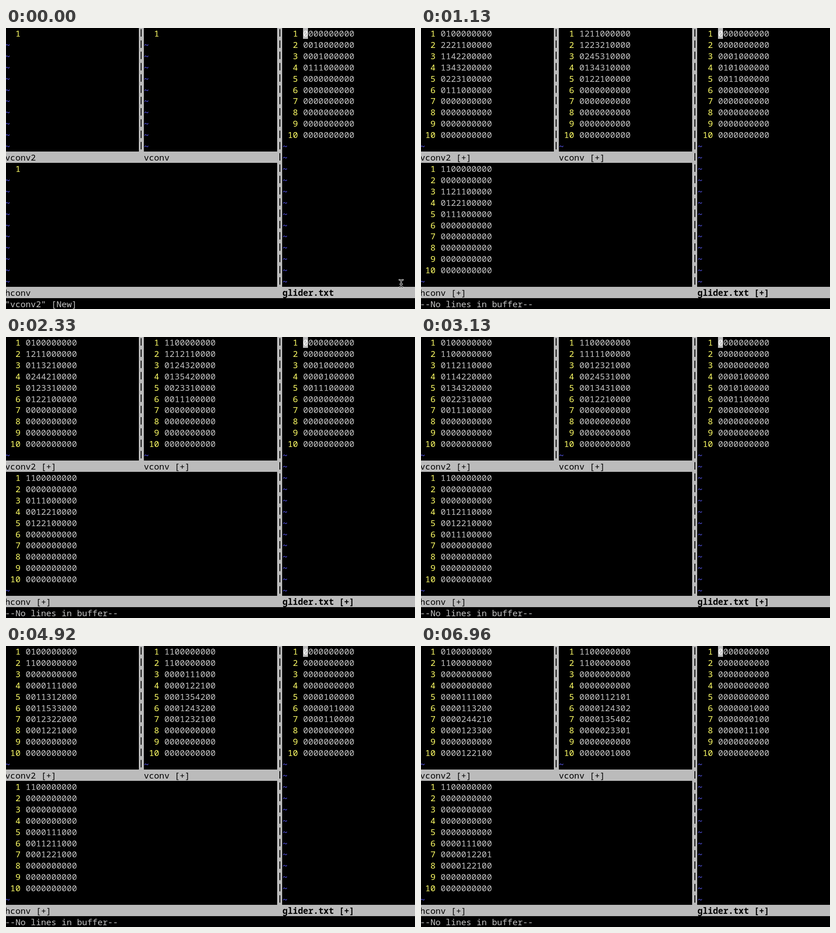
An HTML page that plays this animation: 902x621 px, repeating every 7000 ms.

```html
<!DOCTYPE html>
<html lang="en">
<head>
<meta charset="utf-8">
<title>Glider in four editor windows</title>
<style>
  html, body { margin: 0; width: 100%; height: 100%; overflow: hidden; background: #000; }
  svg { display: block; }
  text { font: 18.88px "Noto Sans Mono", "DejaVu Sans Mono", monospace; white-space: pre; fill: #c4c4c4; }
  .number { fill: #ffff66; }
  .tilde { fill: #5c5cff; }
  .status { fill: #000; }
  .active { fill: #000; font-weight: 600; }
  .under { fill: #fff; }
  .bar { fill: #bbb; }
  .split { stroke: #000; stroke-width: 2; stroke-dasharray: 16.5 8.42; }
</style>
</head>
<body>
<svg id="stage" width="902" height="621" viewBox="0 0 902 621"></svg>
<script>
const SIZE = 10, LOOP = 7000;
const FIRST = 291, STEP = 416.7;
const CELL_W = 11.33, CELL_H = 24.92;
const stage = document.getElementById('stage');

const colX = col => col * CELL_W - 2;
const rowY = row => Math.round(row * CELL_H - 1.1);
const range = n => Array.from({ length: n }, (_, i) => i);
const makeGrid = cell => range(SIZE).map(r => range(SIZE).map(c => cell(r, c)));
const at = (grid, r, c) => grid[r]?.[c] ?? 0;
const transpose = grid => makeGrid((r, c) => grid[c][r]);

function nextLife(grid) {
  return makeGrid((r, c) => {
    let sum = 0;
    for (const dr of [-1, 0, 1]) for (const dc of [-1, 0, 1]) sum += at(grid, r + dr, c + dc);
    return +(sum === 3 || (sum === 4 && grid[r][c]));
  });
}

// Sums of three along each line; the last line is skipped and column 9 spills into 10.
function convolve(grid) {
  return grid.map((line, r) => {
    if (r === SIZE - 1) return line;
    const sums = line.map((v, c) => at(grid, r, c - 1) + v + at(grid, r, c + 1));
    return [...sums.slice(0, 8), 0, sums[8]];
  });
}

function buffers(grid) {
  const marked = makeGrid((r, c) => r + c === 0 ? 1 : grid[r][c]);
  const hconv = convolve(marked);
  const vconv = convolve(transpose(hconv));
  const total = transpose(vconv);
  const vconv2 = makeGrid((r, c) => {
    const from = c < 8 ? c : 17 - c;
    return total[r][from] - marked[r][from];
  });
  return { hconv, vconv, vconv2 };
}

const start = ['0010', '0001', '0111'];
const lives = [makeGrid((r, c) => +(start[r - 1]?.[c] ?? 0))];
while (lives.length < 17) lives.push(nextLife(lives.at(-1)));

const write = (col, row, string, kind = '') =>
  `<text x="${colX(col)}" y="${rowY(row) + 20}" class="${kind}">${string}</text>`;
const bar = (x, y, w, h) => `<rect class="bar" x="${x}" y="${y}" width="${w}" height="${h}"/>`;

function pane(col, row, height, grid) {
  const lines = grid ? grid.map(line => line.join('')) : [''];
  return range(height).map(i => i < lines.length
    ? write(col, row + i, String(i + 1).padStart(3), 'number') + write(col + 4, row + i, lines[i])
    : write(col, row + i, '~', 'tilde')).join('');
}

function separator(col, rows) {
  const x = Math.round(colX(col)), mid = Math.round(colX(col + 0.5));
  return bar(x, 0, 11, rowY(rows)) +
    `<path class="split" d="M${mid} 2.5V${rowY(rows) - 3}"/>`;
}

function pointer() {
  const beam = 'M867.5 556.5Q871.5 557 871.5 560V569Q871.5 572.5 867.5 573' +
    'M875.5 556.5Q871.5 557 871.5 560M871.5 569Q871.5 572.5 875.5 573M869.5 566H873.5';
  return `<g fill="none" stroke-linecap="round"><path d="${beam}" stroke="#eee" stroke-width="3.2"/>` +
    `<path d="${beam}" stroke="#000" stroke-width="1.2"/></g>`;
}

function draw(generation, showPointer) {
  const done = generation > 0;
  const results = done ? buffers(lives[generation - 1]) : {};
  const tag = done ? ' [+]' : '';
  stage.innerHTML =
    '<rect width="902" height="621"/>' +
    bar(0, rowY(11), 609, 25) + bar(0, rowY(23), 902, 25) +
    separator(26, 11) + separator(53, 23) +
    pane(0, 0, 11, results.vconv2) +
    pane(27, 0, 11, results.vconv) +
    pane(0, 12, 11, results.hconv) +
    pane(54, 0, 23, lives[generation]) +
    bar(655, 0, 11, 24) + write(58, 0, '0', 'under') +
    write(0, 11, 'vconv2' + tag, 'status') +
    write(27, 11, 'vconv' + tag, 'status') +
    write(0, 23, 'hconv' + tag, 'status') +
    write(54, 23, 'glider.txt' + tag, 'active') +
    write(0, 24, done ? '--No lines in buffer--' : '"vconv2" [New]') +
    (showPointer ? pointer() : '');
}

let shown = '';
function update(now) {
  const t = now % LOOP;
  const generation = Math.min(16, Math.max(0, Math.floor((t - FIRST) / STEP)));
  const showPointer = t < FIRST;
  const state = `${generation} ${showPointer}`;
  if (state !== shown) draw(generation, showPointer);
  shown = state;
}

const origin = performance.now();
function tick() {
  update(performance.now() - origin);
  requestAnimationFrame(tick);
}
tick();
</script>
</body>
</html>
```
